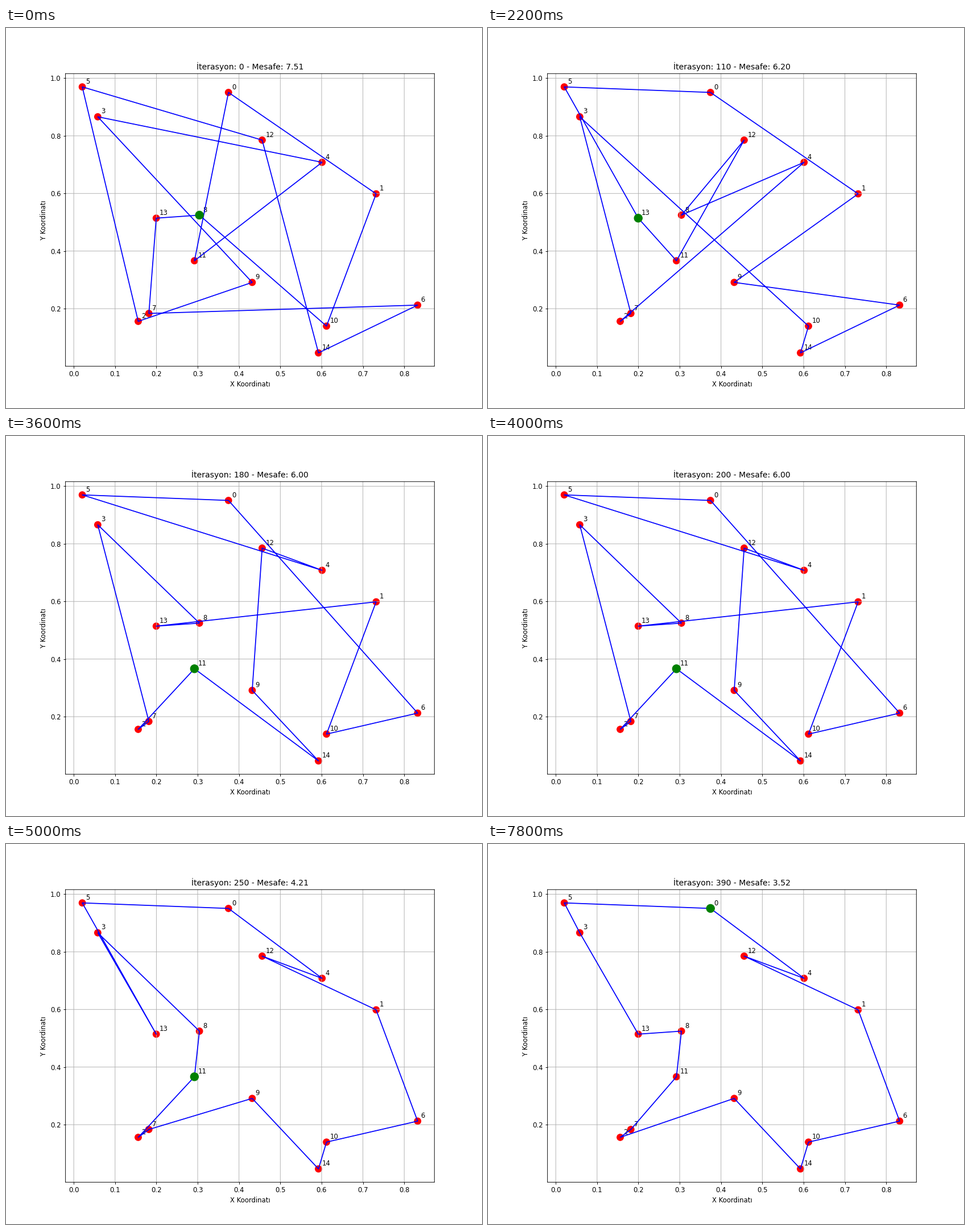
A matplotlib script for the animation above (8 s loop, 837 by 669 pixels).

```python
import random

import numpy as np
import matplotlib.pyplot as plt
from matplotlib.animation import FuncAnimation

DPI = 83.7
CITIES = 15
FRAMES, INTERVAL = 40, 200
ITERATIONS_PER_FRAME = 10

np.random.seed(42)
random.seed(42)
cities = np.random.rand(CITIES, 2)


def flip(tour, i, j):
    """Reverse the stretch of a tour between two positions."""
    return tour[:i] + tour[i:j][::-1] + tour[j:]


# The marked city is the last of each tour.
shuffled = random.sample(range(CITIES), CITIES)
crossing = [11, 12, 8, 4, 2, 7, 3, 10, 14, 6, 9, 1, 0, 5, 13]
zigzag = [14, 9, 12, 4, 5, 0, 6, 10, 1, 13, 8, 3, 7, 2, 11]
ring = [8, 0, 5, 13, 3, 4, 12, 1, 6, 10, 14, 9, 7, 2, 11]
untwisted = flip(ring, 1, 5)
shortened = flip(untwisted, 1, 3)
settled = flip(shortened, 12, 14)
best = settled[5:] + settled[:5]

# Each tour holds from its frame until the next one.
schedule = {0: shuffled, 3: crossing, 16: zigzag, 21: ring,
            23: untwisted, 26: shortened, 28: best}


def closed_path(tour):
    return cities[tour[-1:] + tour]


def length(path):
    return np.hypot(*np.diff(path, axis=0).T).sum()


def dots(color, size, zorder):
    return ax.scatter(*cities.T, c=[color] * CITIES, s=size, zorder=zorder)


fig, ax = plt.subplots(figsize=(837.001 / DPI, 669.001 / DPI), dpi=DPI)
dots("red", 100, 1)
for i, city in enumerate(cities):
    ax.annotate(str(i), city, xytext=(5, 5), textcoords="offset points")

low, high = cities.min(axis=0), cities.max(axis=0)
pad = 0.05 * (high - low)
ax.set_xlim(low[0] - pad[0], high[0] + pad[0])
ax.set_ylim(low[1] - pad[1], high[1] + pad[1])
ax.set_xlabel("X Koordinatı")
ax.set_ylabel("Y Koordinatı")
ax.tick_params(axis="x", pad=2.9)
ax.grid(True)
for part in [*ax.get_xgridlines(), *ax.get_ygridlines(), *ax.spines.values()]:
    part.set_snap(False)

route, = ax.plot([], [], "b-", zorder=4)
marked = dots("green", 150, 5)
title = ax.set_title("")


def update(frame):
    tour = schedule[max(k for k in schedule if k <= frame)]
    path = closed_path(tour)
    route.set_data(*path.T)
    marked.set_offsets(path[:1])
    title.set_text(f"İterasyon: {frame * ITERATIONS_PER_FRAME}"
                   f" - Mesafe: {length(path):.2f}")
    return route, marked, title


anim = FuncAnimation(fig, update, frames=FRAMES, interval=INTERVAL,
                     init_func=lambda: update(0), repeat=True, repeat_delay=0)
plt.show()
```
